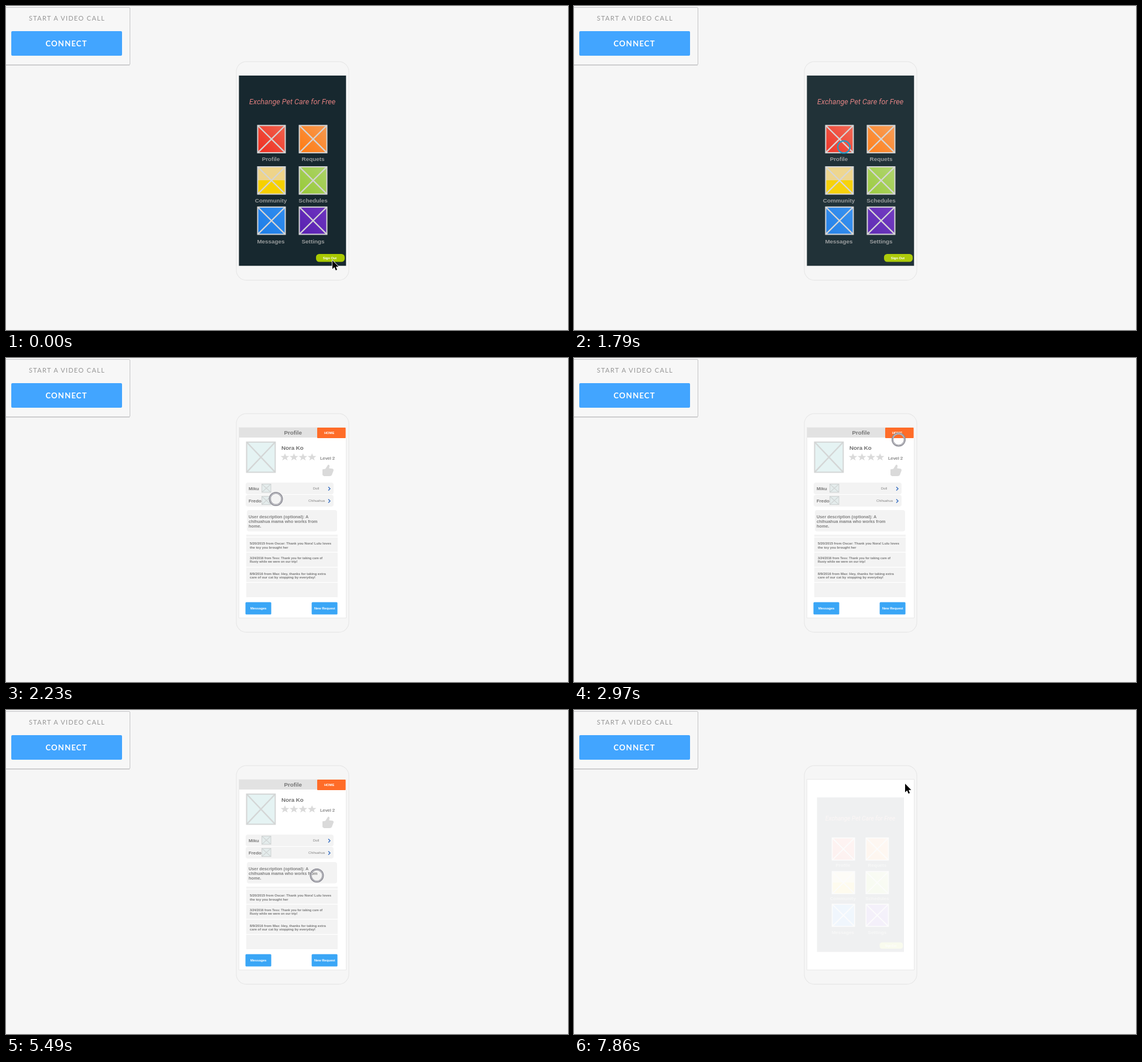
Animation of 959 by 554 pixels, one loop 8 s. Source, as an HTML page:

```html
<!DOCTYPE html>
<html lang="en">
<head>
<meta charset="utf-8">
<title>Pet care prototype</title>
<style>
html, body { margin: 0; width: 100%; height: 100%; overflow: hidden; background: #f6f6f6; }
svg { display: block; width: 100%; height: 100%; }
text { font-family: "Liberation Sans", Arial, sans-serif; }
.lato { font-family: Lato, sans-serif; }
.title { font-family: Roboto, sans-serif; font-style: italic; }
</style>
</head>
<body>
<svg viewBox="0 0 959 554">
  <defs id="defs"></defs>
  <rect width="959" height="554" fill="#f6f6f6"/>
  <g id="call"></g>
  <g id="phone"></g>
  <g id="home"></g>
  <g id="profile"></g>
  <g id="arrow">
    <path d="M0 0V14.8L3.4 11.6L5.7 16.9L8.1 15.9L5.9 10.7H10.4Z" fill="#000" stroke="#fff" stroke-width="1.6" stroke-linejoin="round" paint-order="stroke"/>
  </g>
  <g id="ring" fill="none">
    <circle r="10.4" stroke="#dcdce0" stroke-width="2.4"/>
    <circle r="11.2" stroke="#8c8c95" stroke-width="1.5"/>
    <circle r="9.3" stroke="#9c9ca4" stroke-width="1.1"/>
  </g>
  <circle id="tap" r="10.4" fill="none" stroke="#2599c4" stroke-width="2.2"/>
</svg>
<script>
const $ = id => document.getElementById(id);
const LOOP = 8000, STEP = 148.3, CX = 488.75, CY = 281.5;

const rect = (x, y, w, h, fill, r = 0, extra = '') =>
  `<rect x="${x}" y="${y}" width="${w}" height="${h}" rx="${r}" fill="${fill}" ${extra}/>`;
const text = (s, x, y, size, fill, extra = 'font-weight="700"') =>
  `<text x="${x}" y="${y}" font-size="${size}" fill="${fill}" ${extra}>${s}</text>`;
const mid = (s, x, y, size, fill) =>
  text(s, x, y, size, fill, 'font-weight="700" text-anchor="middle"');
const crossBox = (x, y, w, h, fill, stroke, sw) =>
  rect(x, y, w, h, fill, 0, `stroke="${stroke}" stroke-width="${sw}"`) +
  `<path d="M${x} ${y}l${w} ${h}m0 ${-h}l${-w} ${h}" stroke="${stroke}" stroke-width="${sw * 1.15}" fill="none"/>`;

function star(cx, cy, r) {
  const pts = [];
  for (let i = 0; i < 10; i++) {
    const a = i * Math.PI / 5 - Math.PI / 2, q = i % 2 ? r * 0.42 : r;
    pts.push((cx + q * Math.cos(a)).toFixed(2) + ',' + (cy + q * Math.sin(a) * 0.86).toFixed(2));
  }
  return `<polygon points="${pts.join(' ')}" fill="#dadada"/>`;
}

function buildCall() {
  $('call').innerHTML =
    rect(-5, 2.5, 216.5, 98, '#f7f7f7', 1.5, 'stroke="#c4c4c6"') +
    rect(0, 100, 211, 1.6, '#c4c4c6') +
    text('START A VIDEO CALL', 39, 25, 11, '#979797', 'class="lato" letter-spacing="1.3"') +
    rect(9, 43, 189, 42, '#42a5ff', 2) +
    text('CONNECT', 67.5, 69, 13.2, '#fff', 'class="lato" font-weight="700" letter-spacing="1.1"');
  $('phone').innerHTML =
    rect(393, 95.2, 192, 373.6, '#f6f6f6', 17, 'stroke="#e8e8e8" stroke-width="1.2"') +
    rect(397.5, 118.5, 183, 326, '#fff', 0, 'stroke="#e9e9e9"');
}

function buildHome() {
  const tiles = [
    ['Profile', '#ee2c20', '#f1634e'], ['Requets', '#ff7a10', '#f79a52'],
    ['Community', '#f6d000', '#eed48a'], ['Schedules', '#98c936', '#acd36a'],
    ['Messages', '#1d7de6', '#318df0'], ['Settings', '#5821b0', '#6d34c0']
  ];
  const tops = [204.3, 275, 343.8], bases = [265, 335.6, 406];
  let out = rect(397.5, 119, 182.7, 325.2, '#17282f') +
    text('Exchange Pet Care for Free', 415, 168, 12.6, '#dc7d7d', 'class="title"');
  let defs = '';
  tiles.forEach(([name, low, high], i) => {
    const col = i % 2, row = i >> 1, x = col ? 500.5 : 429.5, split = i === 2;
    const end = split ? 'x1="0" y1="1" x2="0" y2="0"' : 'x1="0" y1="1" x2="1" y2="0"';
    const cut = split ? `<stop offset=".5" stop-color="${low}"/><stop offset=".5" stop-color="${high}"/>` : '';
    defs += `<linearGradient id="g${i}" ${end}><stop stop-color="${low}"/>${cut}<stop offset="1" stop-color="${high}"/></linearGradient>`;
    out += crossBox(x, tops[row], 47, 46.6, `url(#g${i})`, '#d4d4d4', 2) +
      mid(name, col ? 524 : 452, bases[row], 9.9, '#969a9b');
  });
  $('defs').innerHTML = defs;
  $('home').innerHTML = out + rect(529, 424, 49, 13.6, '#a9c900', 5.5) +
    mid('Sign Out', 552.4, 433, 5.6, '#fff');
}

function buildProfile() {
  const dark = '#777', grey = '#808080', plain = '';
  let out = rect(397.5, 118.5, 183, 326, '#fff') +
    `<path d="M397.5 136V444.5H580.5V137" fill="none" stroke="#e9e9e9"/>` +
    rect(397.5, 118.8, 134, 17.2, '#e2e2e2') + mid('Profile', 489.7, 131, 9.8, '#777') +
    rect(531, 119, 48.6, 18, '#ff6c28', 1) + mid('HOME', 551.6, 129.6, 5.8, '#fff') +
    crossBox(410.6, 143.8, 48.8, 51.6, '#e5f3f3', '#d4d6d6', 2) +
    text('Nora Ko', 470, 157, 9.7, '#6e6e6e');
  for (let i = 0; i < 4; i++) out += star(476 + i * 15.4, 169.8, 7.8);
  out += text('Level 2', 536, 174, 7.8, grey, 'stroke="#808080" stroke-width=".2"') +
    `<path d="M540 190.5L545 189.5L549.5 182.5Q552.5 182 552 185.5L551.3 188.5L558 189.5Q559.8 191 558.5 193.5L556 200Q555 202 552 202H542.5L540 200Z" fill="#dadada"/>`;

  [['Miku', 'Doll', 534], ['Fredo', 'Chihuahua', 544]].forEach(([pet, kind, right], i) => {
    const y = 213 + i * 21;
    out += rect(409, y, 150, 20, '#f3f3f3', 4) + text(pet, 414, y + 12.6, 7.8, dark) +
      crossBox(436.6, y + 2.6, 15.4, 14, '#e4ecec', '#cfd3d3', 1.1) +
      text(kind, right, y + 12, 5.8, grey, 'text-anchor="end"') +
      `<path d="M550 ${y + 7.5}l3 3l-3 3" fill="none" stroke="#3f74c4" stroke-width="1.5"/>`;
  });

  out += rect(411, 260, 154, 36.5, '#f3f3f3', 4);
  ['User description (optional): A', 'chihuahua mama who works from', 'home.'].forEach((line, i) => {
    out += text(line, 414, 273.6 + i * 8.2, 7.3, grey);
  });

  out += rect(410, 302, 156, 107, '#f3f3f3');
  [305.6, 331.5, 357, 383].forEach(y => { out += rect(410, y, 156, 1.3, '#fff'); });
  [
    [319, 6.7, 5.85, '5/20/2015 from Oscar: Thank you Nora! Lulu loves', 'the toy you brought her'],
    [344, 6.2, 5.3, '3/24/2016 from Tess: Thank you for taking care of', 'Rusty while we were on our trip!'],
    [370.5, 6.6, 5.83, '8/9/2016 from Max: Hey, thanks for taking extra', 'care of our cat by stopping by everyday!']
  ].forEach(([y, gap, size, a, b]) => {
    out += text(a, 416, y, size, dark) + text(b, 416, y + gap, size, dark);
  });

  $('profile').innerHTML = out +
    rect(408.6, 417.5, 44, 21, '#3aa6f6', 1.5) + mid('Messages', 430.8, 430, 5.75, '#fff') +
    rect(521.6, 417.5, 44, 21, '#3aa6f6', 1.5) + mid('New Request', 543.8, 430, 5.7, '#fff');
}

// Pointer hotspot: time, x, y
const path = [
  [0, 560, 439], [150, 545, 410], [300, 505, 329], [440, 470, 260], [590, 460.5, 241],
  [2380, 460.5, 241], [2530, 513, 181], [2670, 550, 139.5], [2820, 550, 139.5], [2970, 554, 139.5],
  [3120, 575, 250], [3270, 555, 385], [3410, 480, 407], [3560, 412, 330], [3710, 425, 225],
  [3860, 475, 190], [3990, 510, 186.5], [4440, 552, 189], [4590, 552, 189],
  [4890, 470, 222], [5040, 449, 245], [5340, 500, 280], [5490, 531, 283], [5640, 504, 323],
  [5940, 433, 335], [6240, 490, 348], [6530, 450, 385], [6820, 495, 438],
  [6960, 540, 394], [7260, 556, 235], [7410, 565, 155], [7560, 568, 130], [8000, 568, 130]
];

function pointer(t) {
  let i = 1;
  while (i < path.length - 1 && path[i][0] < t) i++;
  const [t0, x0, y0] = path[i - 1], [t1, x1, y1] = path[i];
  const p = Math.min(1, Math.max(0, (t - t0) / (t1 - t0)));
  return [x0 + (x1 - x0) * p, y0 + (y1 - y0) * p];
}

const clamp = v => Math.min(1, Math.max(0, v));
const fadeOut = (t, start) => 1 - clamp((t - start) / 100);
const popIn = (t, start) => 1 - Math.pow(1 - clamp((t - start) / 350), 1.72);

function place(id, opacity, scale) {
  const el = $(id);
  el.style.display = opacity > 0 ? '' : 'none';
  el.setAttribute('opacity', opacity.toFixed(3));
  el.setAttribute('transform', `translate(${CX} ${CY}) scale(${scale}) translate(${-CX} ${-CY})`);
}

function screen(id, shown, entered) {
  place(id, shown, 0.8 + 0.2 * entered);
}

function cursor(id, on, x, y) {
  $(id).style.display = on ? '' : 'none';
  $(id).setAttribute('transform', `translate(${x.toFixed(2)} ${y.toFixed(2)})`);
}

function draw(ms) {
  const t = Math.floor((ms % LOOP + 8) / STEP) * STEP;
  const back = popIn(t, 7847), enter = popIn(t, 1872);
  if (t < 7800) screen('home', fadeOut(t, 1775), 1);
  else screen('home', back, back);
  screen('profile', t < 7800 ? enter : 0, enter);

  const [x, y] = pointer(t);
  const touch = t > 1600 && t < 7800, onHome = t < 1860;
  cursor('arrow', !touch, x - 3, y - 4);
  cursor('tap', touch && onHome, x, y);
  cursor('ring', touch && !onHome, x, y);
}

buildCall();
buildHome();
buildProfile();
const began = performance.now();
function tick() {
  draw(performance.now() - began);
  requestAnimationFrame(tick);
}
draw(0);
requestAnimationFrame(tick);
</script>
</body>
</html>
```
